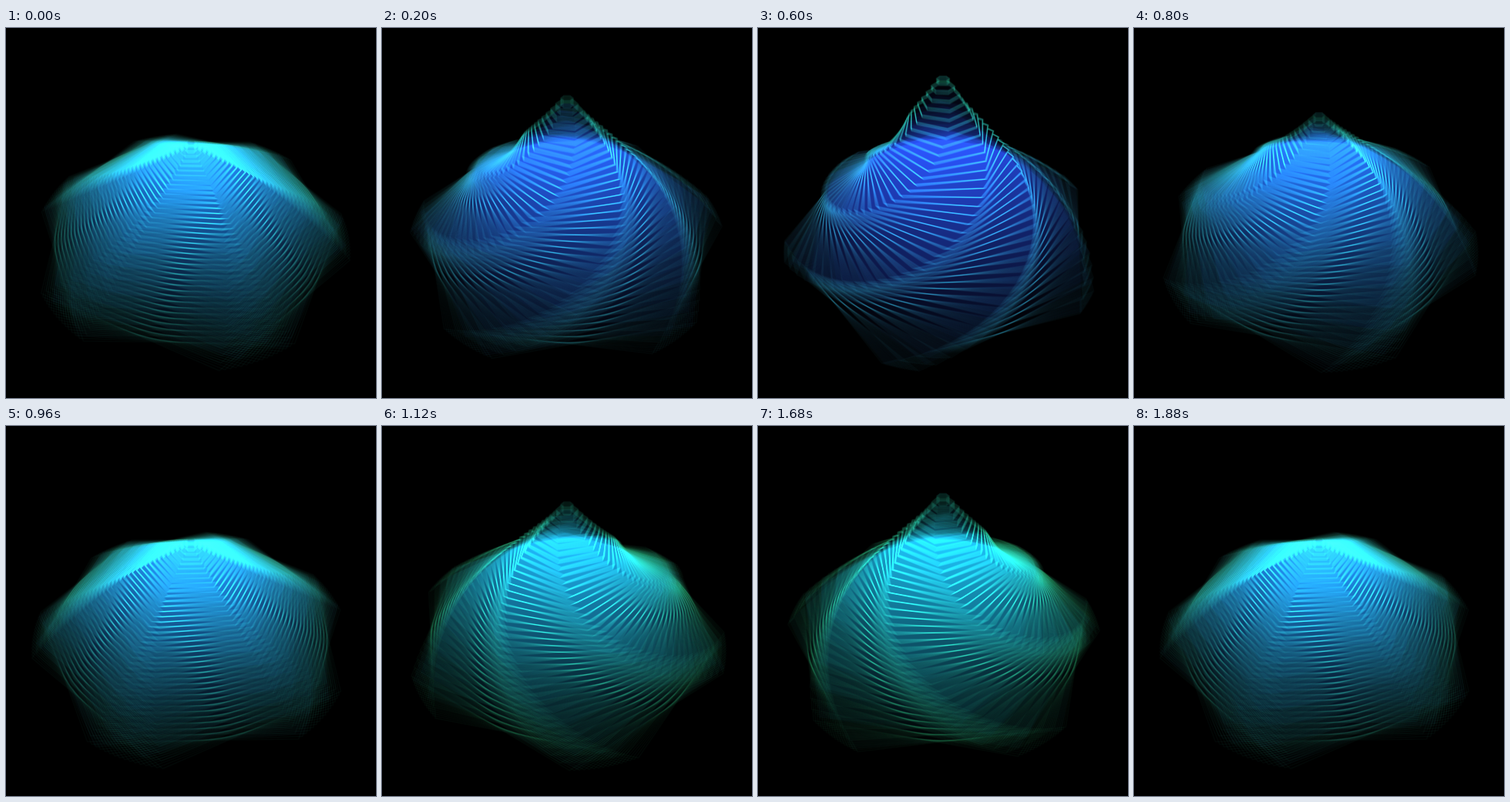
An HTML page with a canvas that plays this animation: 480x480 px, repeating every 1920 ms.

```html
<!DOCTYPE html>
<html lang="en">
<head>
<meta charset="utf-8">
<title>Twisting hexagons</title>
<style>
  html, body { margin: 0; width: 100%; height: 100%; overflow: hidden; background: #000; }
  canvas { display: block; width: 480px; height: 480px; }
</style>
</head>
<body>
<canvas id="stage" width="480" height="480"></canvas>
<script>
const SIZE = 480;
const LOOP = 1920, STEP = 40;   // ms
const LAYERS = 38, SAMPLES = 16;
const CENTER = SIZE / 2, CAMERA = 410, TILT = Math.SQRT1_2;
const TIP_RADIUS = 6, RADIUS = 194.5;

const ctx = document.getElementById('stage').getContext('2d');
const sheet = document.createElement('canvas');
sheet.width = sheet.height = SIZE;
const pen = sheet.getContext('2d');
pen.lineWidth = 1.4;
pen.lineJoin = 'round';

// The glow weakens towards the viewer.
const shade = ctx.createLinearGradient(0, 148, 0, 410);
shade.addColorStop(0, '#fff');
shade.addColorStop(1, '#808080');

const swing = t => Math.sin(2 * Math.PI * t / LOOP);

// Fractional colour levels are spread over neighbouring layers.
const spread = (v, i) => Math.floor(v + (i * 0.618) % 1);

function clear(c, style) {
  c.fillStyle = style;
  c.fillRect(0, 0, SIZE, SIZE);
}

// One hexagon of the tent, turned, lifted and seen from 45 degrees above.
function hexagon(c, u, s) {
  const r = TIP_RADIUS + (RADIUS - TIP_RADIUS) * u;
  const v = 1 - u;
  const h = 95 * v + 85 * Math.abs(s) * v * v;
  const turn = Math.PI * s * u;
  c.beginPath();
  for (let i = 0; i < 6; i++) {
    const a = turn + i * Math.PI / 3;
    const d = r * Math.sin(a);
    const k = CAMERA / (CAMERA - TILT * (d + h));
    c.lineTo(CENTER + r * Math.cos(a) * k, CENTER + TILT * (d - h) * k);
  }
  c.closePath();
}

function drawGlow(t) {
  ctx.globalCompositeOperation = 'lighter';
  for (let k = 0; k < LAYERS; k++) {
    const s = swing(t + STEP * ((k * 0.382) % 1));
    const r = spread(1.2 + 0.3 * s, k);
    const g = spread(5 - 2.3 * s, k + 3);
    const b = spread(8.6 + 0.4 * s, k + 7);
    hexagon(ctx, k / (LAYERS - 1), s);
    ctx.fillStyle = `rgb(${r},${g},${b})`;
    ctx.fill();
  }
  ctx.globalCompositeOperation = 'multiply';
  clear(ctx, shade);
}

// Outlines from the rim to the tip; inner layers hide what lies behind them.
function drawTent(s) {
  clear(pen, '#000');
  pen.fillStyle = '#000';
  for (let k = LAYERS - 1; k >= 0; k--) {
    const u = k / (LAYERS - 1);
    const power = 1.15 - 0.45 * u;
    const g = (155 - 20 * s * u) * power;
    const b = (125 + 42 * s * u) * power;
    hexagon(pen, u, s);
    pen.fill();
    pen.strokeStyle = `rgb(${26 * power},${g},${b})`;
    pen.stroke();
  }
}

// The shutter stays open for the whole step.
function drawLines(t) {
  ctx.globalCompositeOperation = 'lighter';
  ctx.globalAlpha = 1 / SAMPLES;
  for (let j = 0; j < SAMPLES; j++) {
    drawTent(swing(t + STEP * (j + 0.5) / SAMPLES));
    ctx.drawImage(sheet, 0, 0);
  }
  ctx.globalAlpha = 1;
}

function draw(t) {
  ctx.globalCompositeOperation = 'source-over';
  clear(ctx, '#000');
  drawGlow(t);
  drawLines(t);
}

const start = performance.now();
let shown = -1;
function tick() {
  const elapsed = (performance.now() - start) % LOOP;
  const t = Math.floor(elapsed / STEP) * STEP;
  if (t !== shown) draw(shown = t);
  requestAnimationFrame(tick);
}
tick();
</script>
</body>
</html>
```
